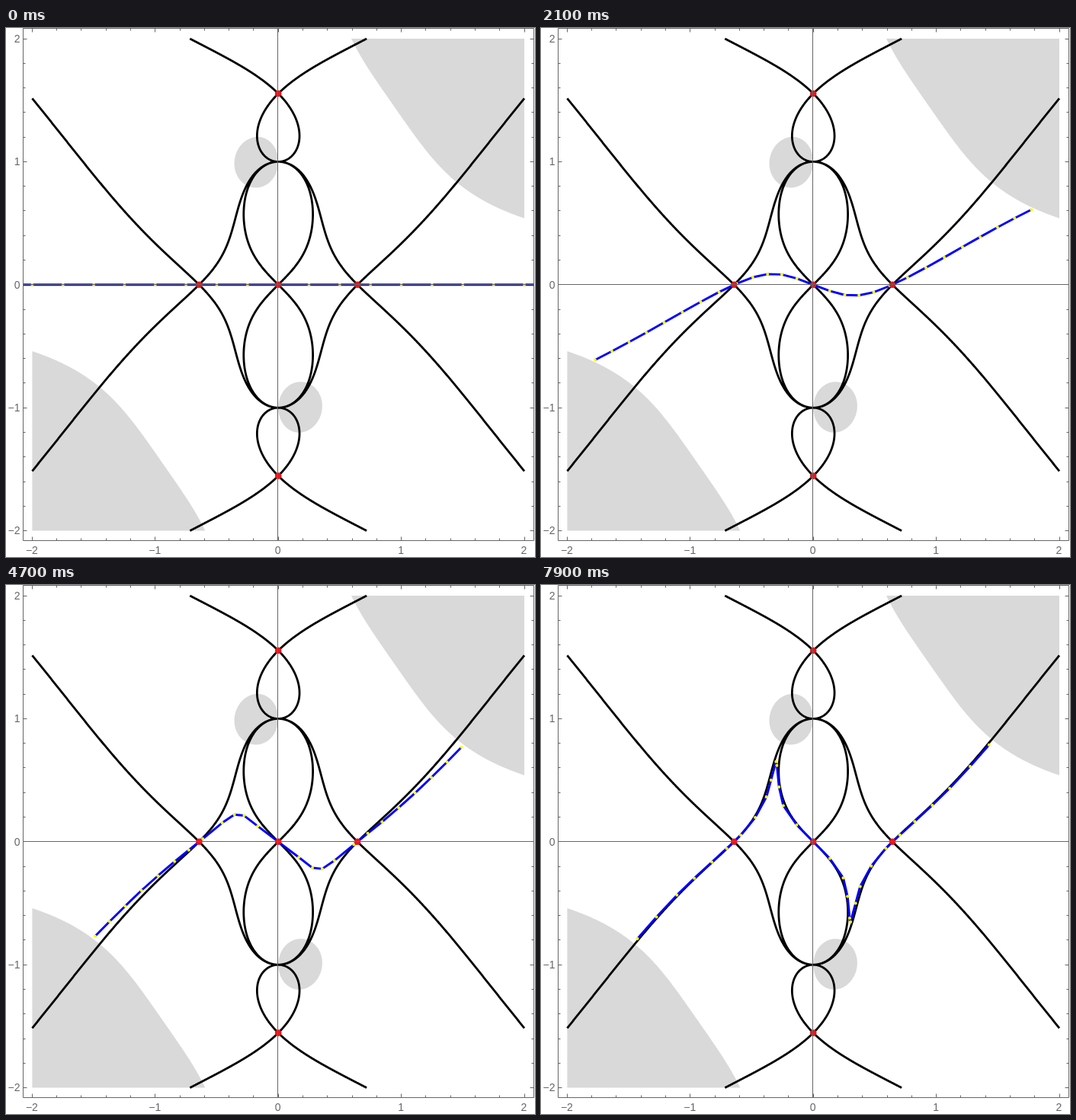
An HTML page with a canvas that plays this animation: 694 by 694 pixels, repeating every 8 s.

```html
<!DOCTYPE html>
<html lang="en">
<head>
<meta charset="utf-8">
<title>Contour flow</title>
<style>
html, body { margin: 0; width: 100%; height: 100%; overflow: hidden; background: #fff; }
canvas { display: block; }
</style>
</head>
<body>
<canvas id="stage" width="694" height="694"></canvas>
<script>
const ctx = document.getElementById('stage').getContext('2d');
const UNIT = 161.4, CX = 357.2, CY = 336.8;
const STEPS = 80, STEP_MS = 100, DT = 0.02, MAX_LEN = 0.25, LIMIT = 1;
const FRAME = { l: 22.5, t: 0.5, r: 692.5, b: 672.5 };
const px = x => CX + UNIT * x;
const py = y => CY - UNIT * y;

// Action S(z) = z^2/2 + 1/(1+z^2): imaginary part and derivative
function imS(x, y) {
  const u = 1 + x * x - y * y, v = 2 * x * y;
  return x * y - v / (u * u + v * v);
}
function dS(x, y) {
  const u = 1 + x * x - y * y, v = 2 * x * y;
  const a = u * u - v * v, b = 2 * u * v, m = a * a + b * b;
  return [x - 2 * (x * a + y * b) / m, y - 2 * (y * a - x * b) / m];
}

// Follows k * conj(S') at unit speed until a pole or the plot edge
function trace(x, y, kr, ki) {
  const h = 0.004, path = [[x, y]];
  const dir = (x, y) => {
    const [a, b] = dS(x, y), n = Math.hypot(a, b);
    return [(kr * a + ki * b) / n, (ki * a - kr * b) / n];
  };
  for (let i = 0; i < 2000; i++) {
    const d = dir(x, y);
    const m = dir(x + d[0] * h / 2, y + d[1] * h / 2);
    const nx = x + m[0] * h, ny = y + m[1] * h;
    const over = Math.max(Math.abs(nx), Math.abs(ny));
    if (over > 2) {
      const now = Math.max(Math.abs(x), Math.abs(y));
      const f = (2 - now) / (over - now);
      path.push([x + (nx - x) * f, y + (ny - y) * f]);
      break;
    }
    x = nx; y = ny;
    path.push([x, y]);
    if (Math.hypot(x, Math.abs(y) - 1) < 0.012) {
      path.push([0, Math.sign(y)]);
      break;
    }
  }
  return path;
}

const X1 = Math.sqrt(Math.SQRT2 - 1), Y1 = Math.sqrt(Math.SQRT2 + 1);
const saddles = [[0, 0], [X1, 0], [-X1, 0], [0, Y1], [0, -Y1]];
const curves = [];
for (const [x, y] of saddles) {
  for (const sx of [-1, 1]) for (const sy of [-1, 1]) {
    const e = 0.002, ax = x + sx * e, ay = y + sy * e;
    const [a, b] = dS(ax, ay);
    // i * conj(S') = (b, a): pick the sign leading away from the saddle
    const k = b * sx + a * sy > 0 ? 1 : -1;
    curves.push([[x, y], ...trace(ax, ay, 0, k)]);
  }
}

const corner = trace(2, 0.5403, -1, 0).concat([[2, 2]]);
const blob = trace(-0.3574, 0.98, 1, 0)
  .concat(trace(-0.3574, 0.98, -1, 0).reverse());
const mirror = path => path.map(([x, y]) => [-x, -y]);
const regions = [corner, mirror(corner), blob, mirror(blob)];

// Flow of the real line: drop sunk pieces, move the points, split long pieces
function simulate() {
  const frames = [];
  let pts = [], segs = [];
  for (let i = -12; i <= 12; i++) pts.push({ x: i / 4, y: 0 });
  for (let i = 1; i < pts.length; i++) segs.push([pts[i - 1], pts[i]]);
  for (let n = 0; n < STEPS; n++) {
    if (n) {
      const alive = p => imS(p.x, p.y) < LIMIT;
      segs = segs.filter(([a, b]) => alive(a) && alive(b));
      for (const p of new Set(segs.flat())) {
        const [a, b] = dS(p.x, p.y);
        p.x += DT * b;
        p.y += DT * a;
      }
      segs = segs.flatMap(([a, b]) => {
        if (Math.hypot(a.x - b.x, a.y - b.y) <= MAX_LEN) return [[a, b]];
        const m = { x: (a.x + b.x) / 2, y: (a.y + b.y) / 2 };
        return [[a, m], [m, b]];
      });
    }
    frames.push({
      lines: segs.map(([a, b]) => [[a.x, a.y], [b.x, b.y]]),
      dots: [...new Set(segs.flat())].map(p => [p.x, p.y])
    });
  }
  return frames;
}
const frames = simulate();

function addPath(path) {
  path.forEach(([x, y], i) => ctx[i ? 'lineTo' : 'moveTo'](px(x), py(y)));
}
function strokeAll(paths, color, width) {
  ctx.strokeStyle = color;
  ctx.lineWidth = width;
  ctx.beginPath();
  paths.forEach(addPath);
  ctx.stroke();
}
function dot(x, y, r, color) {
  ctx.fillStyle = color;
  ctx.beginPath();
  ctx.arc(px(x), py(y), r, 0, 2 * Math.PI);
  ctx.fill();
}
function line(x1, y1, x2, y2) {
  ctx.moveTo(x1, y1);
  ctx.lineTo(x2, y2);
}

function drawAxes() {
  const { l, t, r, b } = FRAME;
  ctx.strokeStyle = '#666';
  ctx.lineWidth = 1;
  ctx.beginPath();
  ctx.rect(l, t, r - l, b - t);
  line(356.5, t, 356.5, b);
  line(l, 336.5, r, 336.5);
  for (let i = -10; i <= 10; i++) {
    const len = i % 5 ? 3 : 5;
    const x = Math.floor(px(i / 5)) + 0.5, y = Math.floor(py(i / 5)) + 0.5;
    line(x, b, x, b - len);
    line(x, t, x, t + len);
    line(l, y, l + len, y);
    line(r, y, r - len, y);
  }
  ctx.stroke();
  ctx.fillStyle = '#666';
  ctx.font = '14px "Liberation Sans", Arial, sans-serif';
  for (let i = -2; i <= 2; i++) {
    const label = (i < 0 ? '\u2212' : '') + Math.abs(i);
    ctx.textAlign = 'center';
    ctx.fillText(label, px(i) - 0.5, 690);
    ctx.textAlign = 'right';
    ctx.fillText(label, 18.5, py(i) + 4.7);
  }
}

function draw(ms) {
  const { lines, dots } = frames[Math.floor(ms / STEP_MS) % STEPS];
  ctx.fillStyle = '#fff';
  ctx.fillRect(0, 0, 694, 694);
  ctx.save();
  ctx.beginPath();
  ctx.rect(FRAME.l, FRAME.t, FRAME.r - FRAME.l, FRAME.b - FRAME.t);
  ctx.clip();
  ctx.lineJoin = 'round';
  ctx.fillStyle = '#d9d9d9';
  for (const path of regions) {
    ctx.beginPath();
    addPath(path);
    ctx.fill();
  }
  strokeAll(curves, '#000', 2.8);
  strokeAll(lines, '#00f', 2.9);
  for (const [x, y] of dots) dot(x, y, 2, '#ff0');
  for (const [x, y] of saddles) dot(x, y, 4.3, '#e8141c');
  ctx.restore();
  drawAxes();
}

const start = performance.now();
function tick() {
  draw((performance.now() - start) % (STEPS * STEP_MS));
  requestAnimationFrame(tick);
}
tick();
</script>
</body>
</html>
```
